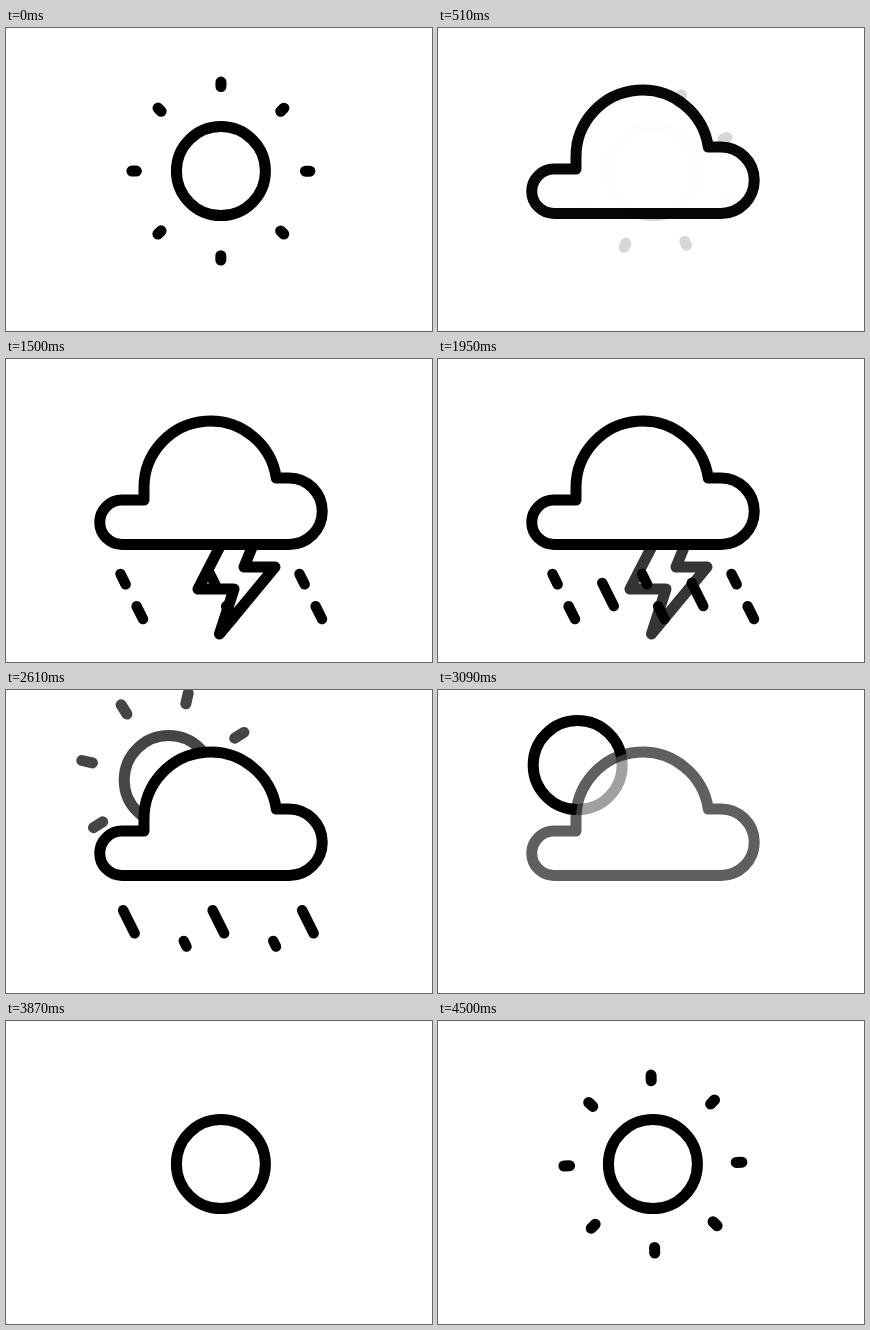
An HTML page with a canvas for the animation above (4530 ms loop, 426x303 px).

```html
<!DOCTYPE html>
<html lang="en">
<head>
<meta charset="utf-8">
<title>Weather</title>
<style>
  html, body { margin: 0; width: 100%; height: 100%; overflow: hidden; background: #fff; }
  canvas { display: block; }
</style>
</head>
<body>
<canvas id="stage" width="426" height="303"></canvas>
<script>
const ctx = document.getElementById('stage').getContext('2d');
const LOOP = 4530;
const HOME = [214.9, 143.1];  // sun in the middle of the stage
const PEAK = [138, 74];       // sun at its highest point
const DAWN = [192, 109];      // sun hidden behind the cloud

const clamp = v => Math.min(1, Math.max(0, v));
const span = (t, from, to) => clamp((t - from) / (to - from));
const mix = (a, b, p) => [a[0] + (b[0] - a[0]) * p, a[1] + (b[1] - a[1]) * p];
const mod = (a, n) => ((a % n) + n) % n;
const outCubic = p => 1 - (1 - p) ** 3;
const outSine = p => Math.sin(p * Math.PI / 2);
const inOutQuad = p => p < .5 ? 2 * p * p : 1 - 2 * (1 - p) ** 2;

const cloud = new Path2D(
  'M138 141H116A22.25 22.25 0 0 0 116 185.5H283A33.25 33.25 0 0 0 283 119H270.3' +
  'A66.5 66.5 0 0 0 138 129Z');
const bolt = new Path2D('M226 164L192 230H228L213.5 275L269 208H238L256 164Z');

function paint(path, alpha, width, fill) {
  ctx.globalAlpha = alpha;
  ctx.lineWidth = width;
  if (fill) ctx.fill(path);
  ctx.stroke(path);
}

function sunPlace(t) {
  if (t < 1000) return HOME;
  if (t < 3420) return mix(DAWN, PEAK, outCubic(span(t, 2370, 3420)));
  return mix(PEAK, HOME, outSine(span(t, 3420, 3870)));
}

// Rays turn steadily while short dashes flow outward through a fixed window.
function sunPath(t) {
  const [x, y] = sunPlace(t);
  const clock = t < 1000 ? t + LOOP : t;
  const turn = (clock - LOOP) * .0403 * Math.PI / 180;
  const front = 77 + mod(clock - 4050, 880) * .04;
  const inner = Math.max(77, front - 11.7);
  const outer = Math.min(89, front);
  const path = new Path2D();
  path.arc(x, y, 44.5, 0, Math.PI * 2);
  if (inner < 89) {
    for (let i = 0; i < 8; i++) {
      const a = turn + i * Math.PI / 4;
      const c = Math.cos(a), s = Math.sin(a);
      path.moveTo(x + c * inner, y + s * inner);
      path.lineTo(x + c * (outer + .01), y + s * (outer + .01));
    }
  }
  return path;
}

function drawSun(t) {
  if (t > 3420 && t < 3870) {
    // motion blur: average of several moments around t
    const n = 8;
    ctx.globalCompositeOperation = 'lighter';
    for (let i = 0; i < n; i++) {
      paint(sunPath(t + ((i + .5) / n - .5) * 30), 1 / n, 11);
    }
    ctx.globalCompositeOperation = 'source-over';
    return;
  }
  const alpha = t < 1000 ? 1 - span(t, 30, 600) : span(t, 2370, 2700);
  if (alpha > 0) paint(sunPath(t), alpha, 11);
}

function drawCloud(t) {
  const alpha = outSine(span(t, 30, 585)) * (1 - span(t, 2895, 3420));
  if (alpha > 0) paint(cloud, alpha, 11, true);
}

function drawBolt(t) {
  if (t < 770 || t > 2340) return;
  const left = 1 - inOutQuad(span(t, 770, 1330));
  ctx.save();
  ctx.beginPath();
  ctx.rect(0, 182, 426, 121);
  ctx.clip();
  ctx.translate(-65 * left, -96 * left);
  paint(bolt, 1 - span(t, 1850, 2340), 11, true);
  ctx.restore();
}

// One slanted track: dashes enter at the top and are cut off at the bottom.
function addDrops(path, x, y, length, front, period) {
  for (let f = front; f - 23 < length; f += period) {
    const a = Math.max(0, f - 23), b = Math.min(length, f);
    path.moveTo(x + a / 2, y + a);
    path.lineTo(x + b / 2, y + b + .01);
  }
}

function drawRain(t) {
  const alpha = span(t, 750, 900) * (1 - span(t, 2730, 2880));
  if (alpha <= 0) return;
  const path = new Path2D();
  const near = mod((t - 1050) * .3 + 10, 45);
  const far = mod((t - 1050) * .303 + 13, 86.5);
  for (let i = 0; i < 3; i++) {
    addDrops(path, 114.5 + i * 89.5, 215, 45, near, 45);
    if (i < 2) addDrops(path, 162.5 + i * 89.5, 220.5, 36, far, 86.5);
  }
  paint(path, alpha, 10.5);
}

function draw(t) {
  ctx.clearRect(0, 0, 426, 303);
  ctx.strokeStyle = '#000';
  ctx.fillStyle = '#fff';
  ctx.lineCap = ctx.lineJoin = 'round';
  drawSun(t);
  drawBolt(t);
  drawCloud(t);
  drawRain(t);
}

const start = performance.now();
function tick() {
  draw((performance.now() - start) % LOOP);
  requestAnimationFrame(tick);
}
draw(0);
requestAnimationFrame(tick);
</script>
</body>
</html>
```
